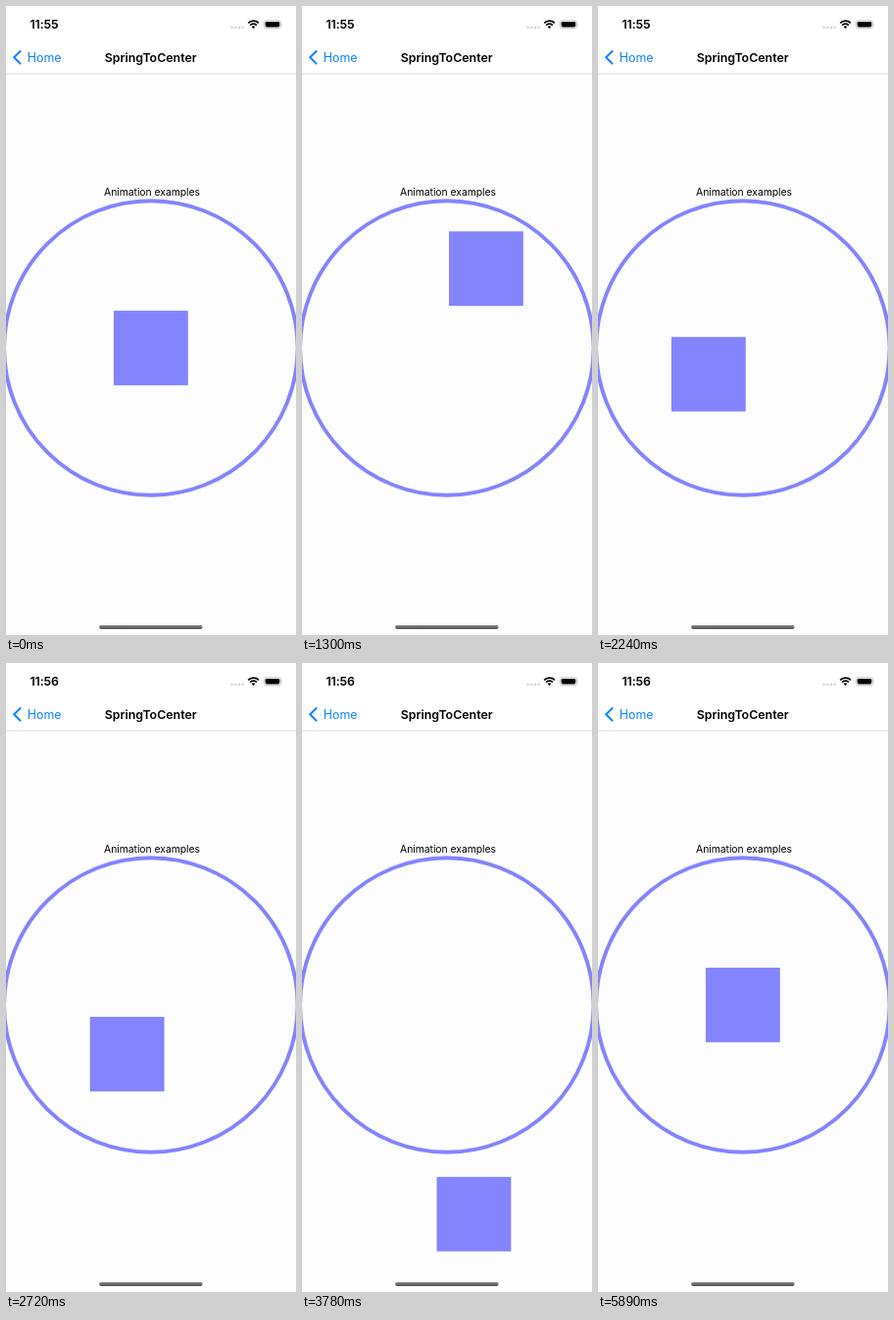
Recreate the animation shown at these times as an HTML page. Size 296x640 px, loop 6.03 s.

```html
<!DOCTYPE html>
<html lang="en">
<head>
<meta charset="utf-8">
<title>SpringToCenter</title>
<style>
  html, body { margin: 0; width: 100%; height: 100%; overflow: hidden; background: #fdfdfd; }
  svg { display: block; width: 296px; height: 640px; }
  text { font: 12.4px Inter, sans-serif; }
  .bold { font-weight: 600; }
  .small { font-size: 10.4px; letter-spacing: -.05px; }
</style>
</head>
<body>
<svg viewBox="0 0 296 640">
  <defs>
    <linearGradient id="bar" x2="0" y2="1"><stop stop-color="#8c8c8c"/><stop offset="1" stop-color="#505050"/></linearGradient>
  </defs>
  <rect width="296" height="69" fill="#fff"/>
  <rect y="68.6" width="296" height=".8" fill="#d8d8d8"/>

  <text id="clock" class="bold" x="24.4" y="23.4" letter-spacing="-.1"></text>
  <path d="M230.6 21.8h12" stroke="#c4c4c4" stroke-width="2.2" stroke-linecap="round" stroke-dasharray="0 3.67"/>
  <path d="M247.2 17.3a7.4 7.4 0 0 1 10.6 0M249.2 19.6a4.6 4.6 0 0 1 6.6 0" fill="none" stroke="#000" stroke-width="1.8"/>
  <path d="M252.5 23l-1.7-1.8a2.4 2.4 0 0 1 3.4 0z"/>
  <rect x="263.4" y="14.6" width="17.2" height="8.2" rx="2.5" fill="none" stroke="#b4b4b4" stroke-width=".8"/>
  <rect x="264.7" y="15.9" width="14.6" height="5.6" rx="1.4"/>
  <path d="M281.5 17.3q1.3 1.4 0 2.8z" fill="#b4b4b4"/>

  <path d="M14.6 46L8.2 52.3L14.6 58.6" fill="none" stroke="#0a84ff" stroke-width="2" stroke-linecap="round" stroke-linejoin="round"/>
  <text x="21.8" y="56.8" fill="#0a84ff">Home</text>
  <text class="bold" x="147.7" y="56.8" text-anchor="middle">SpringToCenter</text>
  <text class="small" x="149" y="193" text-anchor="middle">Animation examples</text>

  <circle cx="147.87" cy="348" r="149.8" fill="none" stroke="#00f" stroke-width="3.9" opacity=".48"/>
  <rect id="box" x="109.95" y="310.05" width="75.85" height="75.85" fill="#00f" opacity=".48"/>
  <rect x="95.1" y="630" width="105.5" height="3.9" rx="1.95" fill="url(#bar)"/>
</svg>
<script>
const LOOP = 6030, MINUTE = 2480;
const clock = document.getElementById('clock'), box = document.getElementById('box');

// The screen refreshes in even bursts: first and last moment (ms), count
const bursts = [[840, 1420, 6], [1520, 2020, 6], [2130, 2720, 6], [2820, 3330, 6],
  [3440, 3780, 4], [4450, 5020, 6], [5140, 5690, 6]];
const ticks = [0, 5890];
for (const [first, last, n] of bursts)
  for (let i = 0; i < n; i++)
    ticks.push(Math.floor((first + (last - first) * i / (n - 1)) / 10) * 10);

// Finger moves along a curve around the centre; held ones do not spring back
const low = [27.6, 212.8];
const drags = [
  { start: 790, end: 1344, from: [0, 0], via: [20, -41], to: [40.7, -82] },
  { start: 2080, end: 2610, from: [0, 0], via: [-101, 70], to: [-40, 82.5] },
  { start: 3400, end: 3780, from: [0, 0], via: [12, 106], to: low, held: true },
  { start: 4400, end: 4630, from: low, via: [21, 130], to: [15, 50] }
];

// Damped spring: mass 1, stiffness 100, damping 10
function spring(s) {
  const w = Math.sqrt(75);
  return Math.exp(-5 * s) * (Math.cos(w * s) + 5 / w * Math.sin(w * s));
}

function offset(t) {
  const d = drags.findLast(d => d.start <= t);
  if (!d) return [0, 0];
  if (t > d.end) {
    const k = d.held ? 1 : spring((t - d.end) / 1000);
    return d.to.map(v => v * k);
  }
  const u = (1 - Math.cos(Math.PI * (t - d.start) / (d.end - d.start))) / 2, r = 1 - u;
  return [0, 1].map(i => r * r * d.from[i] + 2 * r * u * d.via[i] + u * u * d.to[i]);
}

function draw(now) {
  const t = Math.max(...ticks.filter(m => m <= now % LOOP));
  const [x, y] = offset(t);
  box.setAttribute('transform', `translate(${x.toFixed(2)} ${y.toFixed(2)})`);
  clock.textContent = t < MINUTE ? '11:55' : '11:56';
}

const start = performance.now();
function frame() {
  draw(performance.now() - start);
  requestAnimationFrame(frame);
}
frame();
</script>
</body>
</html>
```
